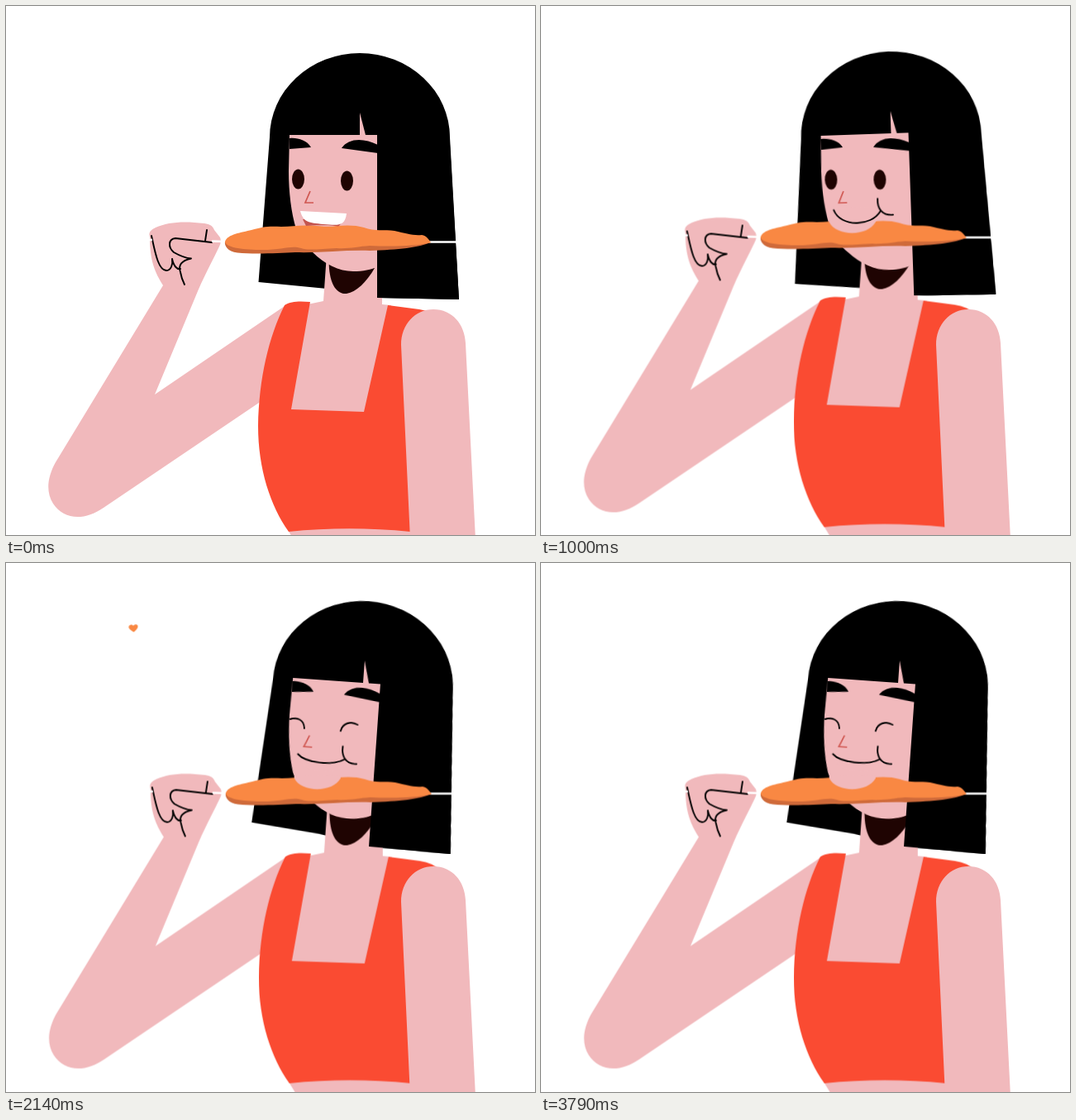
An HTML page without scripts that plays this animation: 640x640 px, repeating every 3870 ms.

```html
<!DOCTYPE html>
<html lang="en">
<head>
<meta charset="utf-8">
<title>Snack time</title>
<style>
  html, body { margin: 0; width: 100%; height: 100%; overflow: hidden; background: #fff; }
  svg { display: block; width: 100vw; height: 100vh; }

  .skin { fill: #f1b9bc; }
  .red { fill: #fa4b32; }
  .orange { fill: #f98843; }
  .dark { fill: #1f0402; }
  .line { fill: none; stroke: #000; stroke-width: 1.9; stroke-linecap: round; stroke-linejoin: round; }
  .stick { fill: none; stroke: #fff; stroke-width: 2.4; }

  .bob, .swing, .head, .heart, .ray, .teeth, .smile { animation: 3870ms ease-in-out infinite; }
  .lips, .bite, .grin, .open, .shut { animation: 3870ms step-end infinite; }

  .bob { animation-name: bob; }
  @keyframes bob {
    0%, 16% { transform: translate(0, 0); }
    10.3% { transform: translate(0, -4.4px); }
    29.5%, 100% { transform: translate(.8px, -6.5px); }
  }

  .swing { animation-name: swing; transform-origin: 354px 391px; }
  @keyframes swing {
    0%, 17.6%, 100% { transform: rotate(0deg); }
    10.1% { transform: rotate(9.7deg); }
  }

  .head { animation-name: head; transform-origin: 449px 353px; }
  @keyframes head {
    0% { transform: translate(0, 0) rotate(0deg); animation-timing-function: ease-in; }
    11.1% { transform: translate(0, -4px) rotate(-2deg); animation-timing-function: ease-out; }
    19.6%, 20.7% { transform: translate(5px, 4px) rotate(-5.6deg); }
    29.5%, 35.1% { transform: translate(.8px, -6.5px) rotate(0deg); }
    44.2%, 100% { transform: translate(-10px, -10px) rotate(4.06deg); }
  }

  .teeth { animation-name: teeth; }
  @keyframes teeth {
    0%, 16.5% { d: path("M356 248C374 249 394 250 412 251C410 268 400 265 384 264C366 262 360 262 356 248Z"); }
    20.4% { d: path("M356 250C368 261 398 263 412 252C404 263 396 266 384 265C372 264 363 260 356 250Z"); }
    24%, 100% { d: path("M356 247C364 266 400 267 412 250C406 260 396 263 384 263C372 262 361 258 356 247Z"); }
  }

  .smile { animation-name: chew; }
  @keyframes chew {
    0%, 35.14%, 49.1%, 63.05%, 77%, 90.96% { d: path("M355.5 246.5C363 267.500 400 268.500 412 249.500"); }
    42.12%, 56.07%, 70.03%, 83.98%, 97.93%, 100% { d: path("M355.5 247.5C365 257 398 259 412 250"); }
  }

  .lips { animation-name: until-bite; }
  .bite { animation-name: from-bite; }
  .grin { animation-name: from-grin; }
  .open { animation-name: until-blink; }
  .shut { animation-name: from-blink; }
  @keyframes until-bite { 0% { opacity: 1; } 18%, 100% { opacity: 0; } }
  @keyframes from-bite { 0% { opacity: 0; } 18%, 100% { opacity: 1; } }
  @keyframes from-grin { 0% { opacity: 0; } 24%, 100% { opacity: 1; } }
  @keyframes until-blink { 0% { opacity: 1; } 39.8%, 100% { opacity: 0; } }
  @keyframes from-blink { 0% { opacity: 0; } 39.8%, 100% { opacity: 1; } }

  /* Each star is two crossed diamonds scaled by (half width, half length). */
  .big .ray { animation-name: twinkle-big; }
  .small .ray { animation-name: twinkle-small; }
  @keyframes twinkle-big {
    0%, 30.5% { transform: scale(0, 0); }
    35.14% { transform: scale(20.8, 64); }
    37.5% { transform: scale(26, 83); }
    44.19% { transform: scale(.6, 24); }
    46%, 100% { transform: scale(0, 0); }
  }
  @keyframes twinkle-small {
    0%, 34.3% { transform: scale(0, 0); }
    35.14% { transform: scale(2.3, 7); }
    41.3% { transform: scale(17, 62); }
    44.19% { transform: scale(6.7, 57); }
    49%, 100% { transform: scale(0, 0); }
  }

  .heart { animation-name: heart; transform-origin: 154px 106px; }
  @keyframes heart {
    0%, 39.5% { transform: translate(0, 0) scale(0); }
    44.19% { transform: translate(0, 0) scale(1); }
    49.1% { transform: translate(0, -27px) scale(1.25); }
    57.4%, 100% { transform: translate(0, -27px) scale(0); }
  }
</style>
</head>
<body>
<svg viewBox="0 0 640 640">
  <!-- hair behind -->
  <path class="head" d="M319 159A109 102 0 0 1 537 159L548 355 449 353 388 342 305.500 334Z"/>

  <g class="bob">
    <!-- raised arm -->
    <g class="swing">
      <path class="skin" d="M174 280C172 274 175 271 181 268C196 261 216 260 240 263C247 264 250 266 252 271L259 280Q261 285 258 291C252 304 242 322 232 345L180 470 340 361 365 440 306 480 118 607C95 623 70 622 57 602C48 588 50 570 60 552L190 338C180 322 174 308 174 280Z"/>
      <g class="line">
        <path d="M176 278C180 296 184 320 194 320C200 320 202 312 201 306C203 315 207 319 211 318"/>
        <path d="M249 286 205 281C196 282 196 292 203 298C210 302 217 305 224 305.500C212 308 208 314 211 322C212 328 214 333 216 337"/>
        <path d="M243 271 241 284"/>
      </g>
    </g>
    <!-- torso -->
    <path class="skin" d="M388 300 384 357 360 362 340 495H440L466 362 455 361V300ZM341 634 360 665H520V620Z"/>
    <path class="dark" d="M390 300 391 318C393 340 402 349 412 348C424 346 436 334 446 317V300Z"/>
    <path class="red" d="M337 362C345 357 355 357 368 358L345 488 433 491 462 362 500 367Q515 369 524 378L520 636H489C440 631 390 631 342 636C320 605 305 560 305 508C306 450 318 400 337 362Z"/>
  </g>

  <path class="skin" d="M478 410C478 385 495 367 517 367C540 367 555 385 556 408L568 645H489Z"/>

  <g class="head">
    <path class="skin" d="M343 156H428V129L435 156H450V315C442 319 432 321 420 321C403 321 385 312 371 298C362 290 355 280 351 270C345 250 342 225 342 200Z"/>
    <path d="M343 160C352 159 364 162 369 171L343 173ZM406 172C414 160 432 159 450 168V178Z"/>
    <path d="M449 150H536L548 355 449 353Z"/>
    <path d="M368 224 362 238H372" fill="none" stroke="#cf5650" stroke-width="1.7"/>
    <g class="open dark">
      <ellipse cx="353.500" cy="209.500" rx="7.500" ry="12"/>
      <ellipse cx="412.500" cy="211.500" rx="7.500" ry="12"/>
    </g>
    <path class="shut line" d="M343 206C351 203 360 205 361 216M405 216C407 206 416 203 425 207"/>
  </g>

  <!-- snack -->
  <g class="bob"><g class="swing">
    <path class="stick" d="M168 283H177M249 284.500 265 285M510 285.500H575"/>
    <path fill="#cf6a3a" d="M265 285C264 290 268 297 280 298.500C300 300.500 330 299 350 298C380 299 410 295 440 296C475 295 500 292 514 286L400 275Z"/>
    <path class="orange" d="M265 285C268 276 285 274 297 271C310 267 318 266 333 267C345 267 355 265 366 265.500C380 266 390 268 400 266C412 265 424 265 433 268C446 273 458 270 470 272C484 275 492 278 503 277C509 278 511 282 514 286C495 291 465 291 440 290C425 291 415 294 400 293C380 294 365 296 357 293C345 289 335 295 310 295C290 295 266 293 265 285Z"/>
    <path class="bite skin" d="M348 264V267C356 284 394 285 404 267V263Z"/>
  </g></g>

  <g class="head">
    <path class="lips" fill="#c4554e" d="M359 258 407 261C405 264 404 265 402 266.500C394 265 372 265 363 266Z"/>
    <path class="teeth" fill="#fff" d="M356 248C374 249 394 250 412 251C410 268 400 265 384 264C366 262 360 262 356 248Z"/>
    <g class="grin">
      <path class="skin" d="M352 244H416V252C404 266 400 266 384 266C370 266 362 262 354 250Z"/>
      <path class="smile line" d="M355.500 246.500C363 267.500 400 268.500 412 249.500"/>
      <path class="line" d="M409 234.500C408 246.500 414 255.500 427 254.500"/>
    </g>
  </g>

  <!-- delight -->
  <defs><path id="diamond" d="M0-1 1 0 0 1-1 0Z"/></defs>
  <g class="big red" transform="translate(234 100)">
    <use class="ray" href="#diamond"/>
    <g transform="rotate(90)"><use class="ray" href="#diamond"/></g>
  </g>
  <g class="small red" transform="translate(170 179.500)">
    <use class="ray" href="#diamond"/>
    <g transform="rotate(90)"><use class="ray" href="#diamond"/></g>
  </g>
  <path class="heart orange" d="M157 134C143 124 118 110 120 94C122 78 143 73 154 87C160 76 184 71 188 88C190 106 172 120 157 134Z"/>
</svg>
</body>
</html>
```
